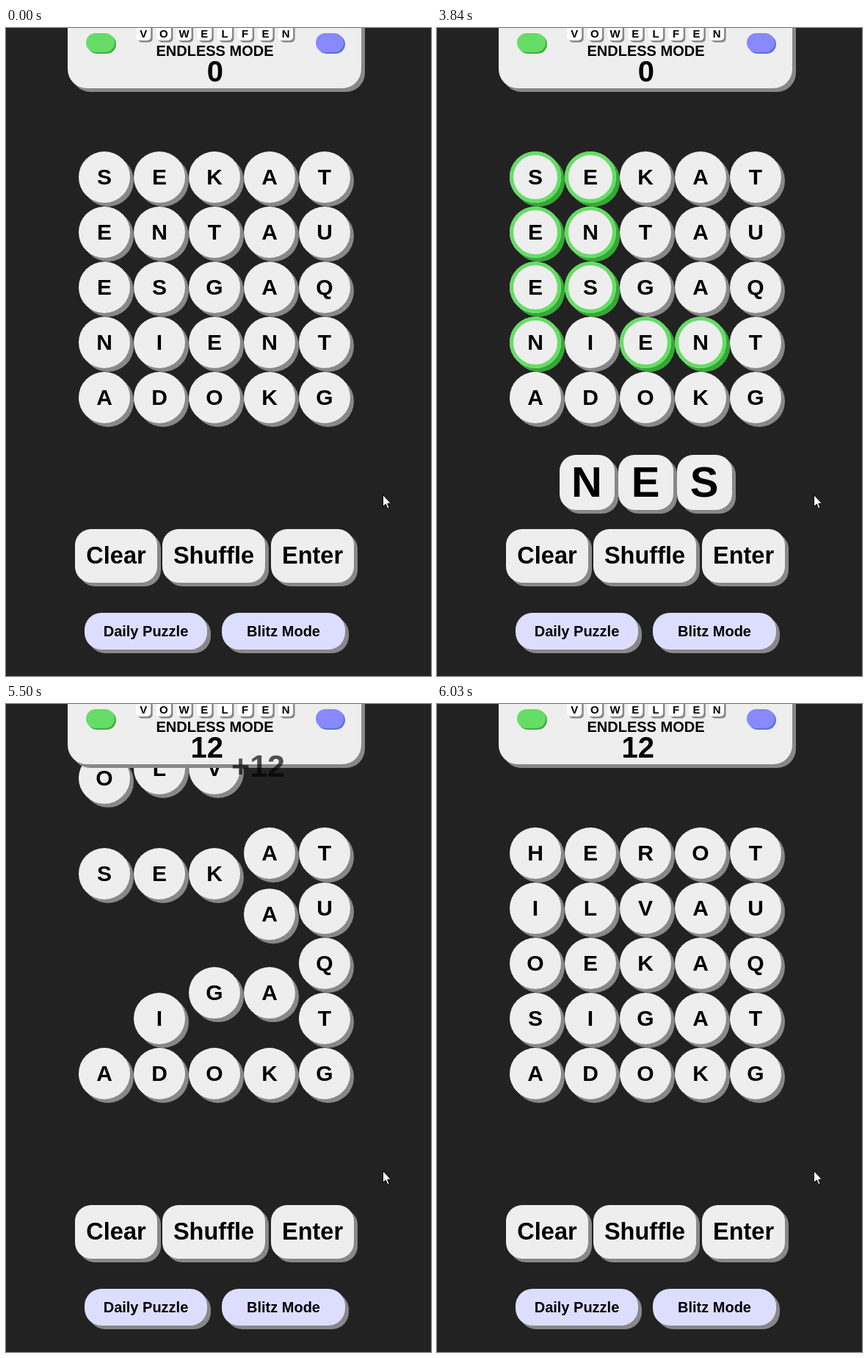
An HTML page that plays this animation: 579x882 px, repeating every 6.89 s.

```html
<!DOCTYPE html>
<html lang="en">
<head>
<meta charset="utf-8">
<title>Word grid</title>
<style>
  html, body { margin: 0; width: 100%; height: 100%; overflow: hidden; background: #222; }
  svg { display: block; width: 579px; height: 882px; }
  text { font-family: "Liberation Sans", Arial, sans-serif; font-weight: bold; text-anchor: middle; }
</style>
</head>
<body>
<svg id="stage" viewBox="0 0 579 882"></svg>
<script>
const LOOP = 6890, CLEARED = 5240;
const LETTERS = "SEKATENTAUESGAQNIENTADOKG";
const FACE = "#eee", SHADE = "#888", GREEN = "#66dd66", DARK_GREEN = "#33aa33";

// Each key press: when it shows, when its highlight starts to fade in, and the matching cells.
const KEYS = [
  { letter: "N", at: 3050, fade: 3050, cells: [6, 15, 18] },
  { letter: "E", at: 3380, fade: 3380, cells: [1, 5, 6, 10, 15, 17, 18] },
  { letter: "S", at: 3780, fade: 3740, cells: [0, 1, 5, 6, 10, 11, 15, 17, 18] },
  { letter: "T", at: 4180, fade: 4180, cells: [5, 6, 7, 10, 11, 15, 17, 18] }
];
const FADE = 100;

// Falling: in every pass a tile gets a new target row and eases there from where it is.
const FIRST_PASS = 5345, PASS = 87, FALL = 300, SPAWN_ROW = -2;
const FALLS = {
  0: [[1, 1], [2, 2], [3, 3]],
  1: [[1, 1], [2, 2]],
  2: [[1, 1], [2, 2]],
  3: [[1, 3]],
  8: [[2, 2]],
  12: [[3, 1]],
  13: [[3, 1]]
};
const SPAWNS = [
  ["O", 0, [[0, 1], [1, 2], [2, 4]]],
  ["I", 0, [[1, 3]]],
  ["H", 0, [[0, 5]]],
  ["L", 1, [[1, 1.85]]],
  ["E", 1, [[0, 3]]],
  ["V", 2, [[1, 1.85]]],
  ["R", 2, [[0, 3]]],
  ["O", 3, [[0, 4.3]]]
];

const stage = document.getElementById("stage");
const clamp = v => Math.max(0, Math.min(1, v));
const show = (node, on) => node.setAttribute("display", on ? "inline" : "none");

function add(parent, tag, attrs, content) {
  const node = document.createElementNS("http://www.w3.org/2000/svg", tag);
  for (const key in attrs) node.setAttribute(key, attrs[key]);
  if (content !== undefined) node.textContent = content;
  parent.appendChild(node);
  return node;
}

function label(parent, content, x, y, size, extra) {
  return add(parent, "text", { x, y, "font-size": size, ...extra }, content);
}

function box(parent, x, y, width, height, rx, fill = FACE, shade = SHADE, depth = 5) {
  add(parent, "rect", { x: x + depth, y: y + depth, width, height, rx, fill: shade });
  add(parent, "rect", { x, y, width, height, rx, fill });
}

function button(content, x, y, width, height, size, baseline, rx, fill) {
  box(stage, x, y, width, height, rx, fill);
  label(stage, content, x + width / 2, baseline, size);
}

function makeTile(letter, col, row, path, spawned) {
  const node = add(stage, "g", {});
  const disc = attrs => add(node, "circle", { r: 35, ...attrs });
  disc({ cx: 5, cy: 5, fill: SHADE });
  const glow = disc({ cx: 5, cy: 5, fill: DARK_GREEN, opacity: 0 });
  disc({ fill: FACE });
  const ring = disc({ r: 32.5, fill: "none", stroke: GREEN, "stroke-width": 5, opacity: 0 });
  label(node, letter, 0, 10, 30);
  return { node, glow, ring, x: 134 + 75 * col, row, path, spawned };
}

const tiles = [...LETTERS].map((letter, i) =>
  makeTile(letter, i % 5, Math.floor(i / 5), FALLS[i] || [], false));
const spawned = SPAWNS.map(([letter, col, path]) => makeTile(letter, col, SPAWN_ROW, path, true));

// Header
box(stage, 84, -60, 400, 142, 26);
[..."VOWELFEN"].forEach((letter, i) => {
  const x = 187.2 + 27.7 * i;
  box(stage, x - 10, -6, 20, 23, 5, "#fff", SHADE, 2.5);
  label(stage, letter, x, 12.5, 15);
});
box(stage, 109, 7, 39, 26, 13, GREEN, "#44aa44", 2);
box(stage, 422, 7, 38, 26, 13, "#8888ff", "#5577cc", 2);
label(stage, "ENDLESS MODE", 284.5, 38, 20);
const score = label(stage, "0", 296, 73, 40, { style: "text-anchor: end" });
const bonus = label(stage, "+12", 343.5, 0, 43);

// Typed word
const typed = KEYS.map(key => {
  const node = add(stage, "g", {});
  box(node, 0, 581, 75, 75, 22);
  label(node, key.letter, 37, 638, 58);
  return node;
});

button("Clear", 94, 682, 112, 73, 32.5, 729, 22);
button("Shuffle", 213, 682, 140, 73, 32.5, 729, 22);
button("Enter", 361, 682, 113, 73, 32.5, 729, 22);
button("Daily Puzzle", 107, 796, 167, 50, 20, 828, 23, "#ddddff");
button("Blitz Mode", 294, 796, 168, 50, 20, 828, 23, "#ddddff");

add(stage, "path", {
  d: "M513.5 635.5V651.5L517.3 648L519.8 654.2L522.2 653.2L519.7 647.2H524.5Z",
  fill: "#fff", stroke: "#000", "stroke-width": 1
});

// Cubic Bézier ease-in-out (.42, 0, .58, 1)
function easeInOut(x) {
  if (x <= 0 || x >= 1) return clamp(x);
  let low = 0, high = 1, s;
  for (let i = 0; i < 20; i++) {
    s = (low + high) / 2;
    const at = 1.26 * s * (1 - s) ** 2 + 1.74 * s * s * (1 - s) + s ** 3;
    if (at < x) low = s; else high = s;
  }
  return s * s * (3 - 2 * s);
}

const passTime = n => FIRST_PASS + (n - 1) * PASS;

function rowAt(tile, t) {
  let row = tile.row;
  tile.path.forEach(([target, pass], i) => {
    const start = passTime(pass);
    const next = tile.path[i + 1];
    const now = next ? Math.min(t, passTime(next[1])) : t;
    row += (target - row) * easeInOut((now - start) / FALL);
  });
  return row;
}

function highlight(cell, t) {
  return KEYS.reduce((level, key) => {
    const goal = key.cells.includes(cell) ? 1 : 0;
    return level + (goal - level) * clamp((t - key.fade) / FADE);
  }, 0);
}

function place(tile, t) {
  tile.node.setAttribute("transform", `translate(${tile.x} ${203 + 75 * rowAt(tile, t)})`);
}

function render(t) {
  const cleared = t >= CLEARED;
  const matched = KEYS[KEYS.length - 1].cells;

  tiles.forEach((tile, i) => {
    show(tile.node, !(cleared && matched.includes(i)));
    const level = highlight(i, t);
    tile.glow.setAttribute("opacity", level);
    tile.ring.setAttribute("opacity", level);
    place(tile, t);
  });
  spawned.forEach(tile => {
    show(tile.node, t >= passTime(tile.path[0][1]));
    place(tile, t);
  });

  const count = cleared ? 0 : KEYS.filter(key => t >= key.at).length;
  typed.forEach((node, i) => {
    show(node, i < count);
    node.setAttribute("transform", `translate(${287 - 40 * count + 80 * i} 0)`);
  });

  score.textContent = cleared ? "12" : "0";
  const rise = clamp((t - CLEARED) / 780);
  bonus.setAttribute("y", 140 - 124 * rise);
  bonus.setAttribute("opacity", 1 - Math.abs(2 * rise - 1));
}

const begin = performance.now();
function tick() {
  render((performance.now() - begin) % LOOP);
  requestAnimationFrame(tick);
}
tick();
</script>
</body>
</html>
```
